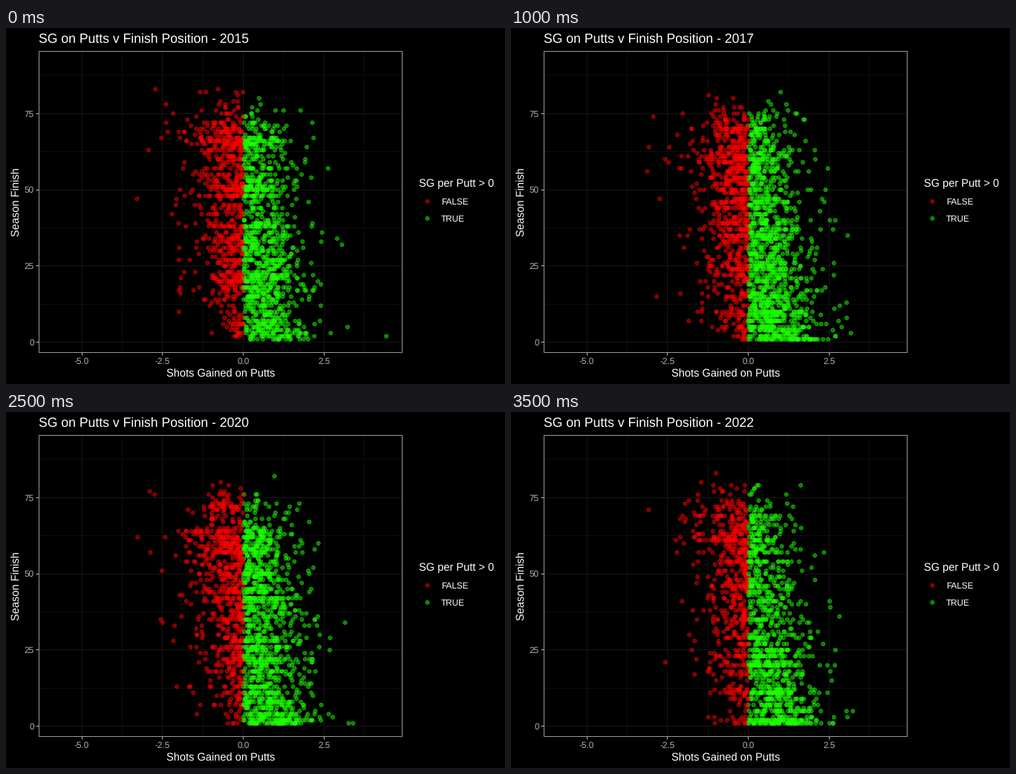
Write a matplotlib script that moves like this. It is 672x480 px and loops after 4 s.

```python
import numpy as np
import matplotlib.pyplot as plt
from matplotlib.animation import FuncAnimation

W, H, DPI = 672, 480, 96
LEFT, RIGHT, TOP, BOTTOM = 44.5, 533.5, 31.5, 437.5
RED, GREEN = (1, 0, 0, 0.5), (0.11, 1, 0, 0.5)
PX = 72 / DPI  # points per pixel

plt.rcParams.update({
    "font.family": "Liberation Sans",
    "text.hinting": "none",
    "axes.unicode_minus": False,
})


def to_x(value):
    return 319.5 + 43.5 * value


def to_y(value):
    return 423.8 - 4.113 * value


def season(year, count, low, high):
    """Random results of one season, with gains between low and high."""
    rng = np.random.default_rng(year)
    places = np.arange(1, 92)
    # Uneven rows come from ties; few players finish beyond the cut.
    weight = rng.gamma(6, 1 / 6, places.size)
    weight *= 1 + 0.3 * np.exp(-places / 12)
    weight /= 1 + np.exp((places - 72) / 2.6)
    finish = rng.choice(places, count, p=weight / weight.sum())
    mean = 0.62 - 0.0115 * finish + 0.5 * np.exp(-finish / 4)
    spread = 0.72 - 0.15 * np.exp(-finish / 4)
    gain = mean + spread * rng.standard_t(12, count)
    inside = (gain > low) & (gain < high)
    # The widest gains: a weak finish and a near win.
    gain = np.append(gain[inside], [low, high])
    finish = np.append(finish[inside],
                       [rng.integers(45, 80), rng.integers(1, 6)])
    spots = np.column_stack([to_x(gain), to_y(finish)])
    colors = np.where(gain[:, None] > 0, GREEN, RED)
    return year, spots, colors


seasons = [
    season(2015, 1800, -3.29, 4.43),
    season(2016, 1900, -2.80, 3.57),
    season(2017, 2050, -3.13, 3.18),
    season(2018, 2250, -2.48, 3.62),
    season(2019, 2300, -2.86, 3.52),
    season(2020, 1900, -3.27, 3.40),
    season(2021, 2450, -3.03, 3.64),
    season(2022, 1650, -3.08, 3.24),
]

fig = plt.figure(figsize=(W / DPI, H / DPI), dpi=DPI, facecolor="black")
ax = fig.add_axes([0, 0, 1, 1])
ax.set_xlim(0, W)
ax.set_ylim(H, 0)
ax.axis("off")


def label(x, y, text, size=8.8, color="white", **kw):
    return ax.text(x, y, text, fontsize=size, color=color,
                   va="baseline", **kw)


def line(xs, ys, color, zorder=1):
    # Half a pixel back, because snapping rounds up to the next pixel centre.
    ax.plot(np.array(xs) - 0.5, np.array(ys) - 0.5, color=color, lw=PX,
            zorder=zorder, solid_capstyle="butt")


def dots(spots, colors):
    return ax.scatter(spots[:, 0], spots[:, 1], s=15.2, c=colors,
                      edgecolors=colors, linewidths=0.94 * PX, zorder=3)


# Grid, ticks and tick labels
MAJOR, MINOR, TICK, TICK_TEXT = "#161616", "#0d0d0d", "#b8b8b8", "#b2b2b2"
for v in np.arange(-3.75, 5, 2.5):
    line([to_x(v)] * 2, [TOP, BOTTOM], MINOR)
for v in np.arange(12.5, 90, 25):
    line([LEFT, RIGHT], [to_y(v)] * 2, MINOR)
for v in np.arange(-5, 5, 2.5):
    line([to_x(v)] * 2, [TOP, BOTTOM], MAJOR, 2)
    line([to_x(v)] * 2, [BOTTOM, BOTTOM + 4], TICK)
    label(to_x(v), 453, f"{v:.1f}", color=TICK_TEXT, ha="center")
for v in range(0, 100, 25):
    line([LEFT, RIGHT], [to_y(v)] * 2, MAJOR, 2)
    line([LEFT - 4, LEFT], [to_y(v)] * 2, TICK)
    label(37.6, to_y(v) + 4.2, str(v), color=TICK_TEXT, ha="right")
line([LEFT, RIGHT, RIGHT, LEFT, LEFT], [TOP, TOP, BOTTOM, BOTTOM, TOP],
     "#999999", 4)

# Titles and legend
title = label(44, 20, "", 13.2)
label(289, 471, "Shots Gained on Putts", 11, ha="center")
label(19, 234.8, "Season Finish", 11, ha="center", rotation=90,
      rotation_mode="anchor")
label(555.7, 214, "SG per Putt > 0", 11)
label(586, 238, "FALSE")
label(586, 261, "TRUE")
dots(np.array([(567.5, 233.7), (567.5, 256.7)]), np.array([RED, GREEN]))

cloud = dots(seasons[0][1], seasons[0][2])


def update(frame):
    year, spots, colors = seasons[frame]
    title.set_text(f"SG on Putts v Finish Position - {year}")
    cloud.set_offsets(spots)
    cloud.set_facecolor(colors)
    cloud.set_edgecolor(colors)
    return title, cloud


anim = FuncAnimation(fig, update, frames=len(seasons), interval=500,
                     repeat=True, repeat_delay=0)
plt.show()
```
